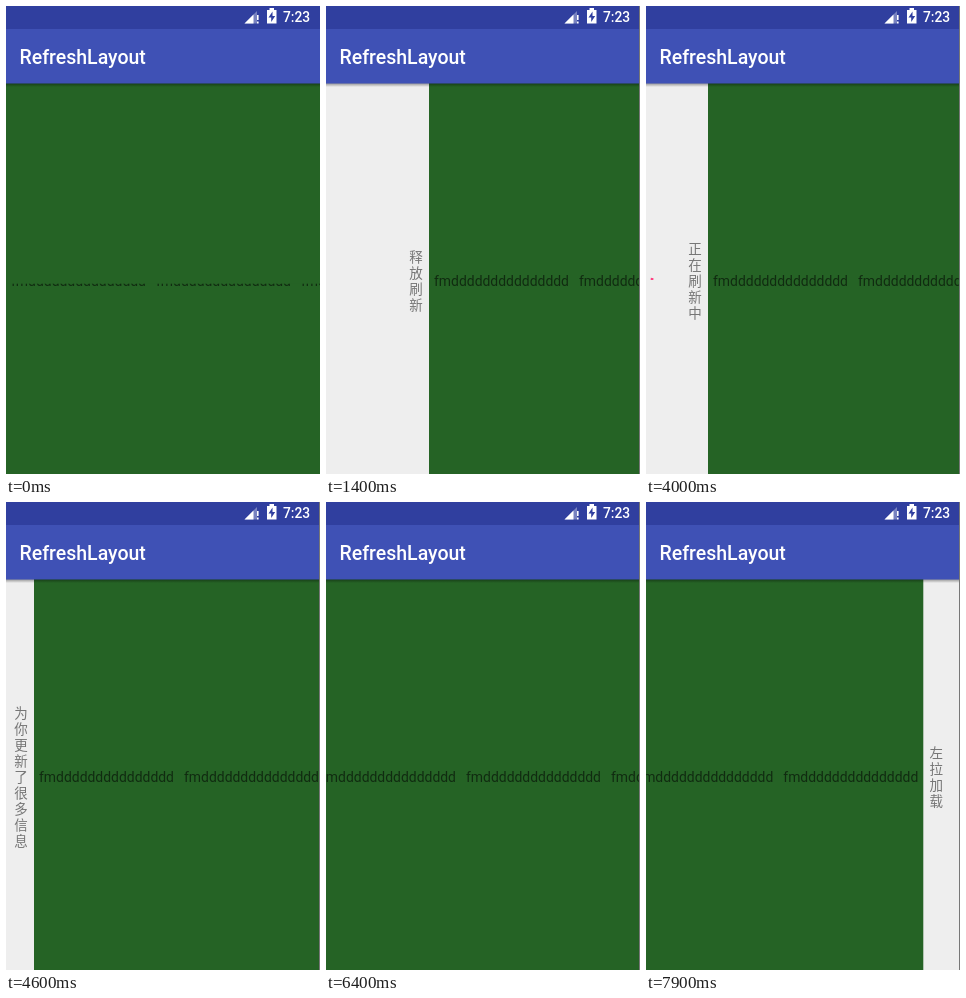
An HTML page for the animation above (8000 ms loop, 314 by 468 pixels).

```html
<!DOCTYPE html>
<html lang="en">
<head>
<meta charset="utf-8">
<title>RefreshLayout</title>
<style>
  html, body { margin: 0; width: 100%; height: 100%; overflow: hidden; background: #256325; }
  svg { display: block; width: 314px; height: 468px; }
  .bar { font-family: Roboto, sans-serif; font-weight: 500; fill: #fff; }
  .item { font: 13.95px Roboto, sans-serif; fill: #000; fill-opacity: .56; }
  .label { font: 13.5px "Noto Sans CJK SC", "Noto Sans CJK", "Noto Sans CJK JP", sans-serif; fill: #757575; text-anchor: middle; }
</style>
</head>
<body>
<svg viewBox="0 0 314 468">
  <defs>
    <linearGradient id="shade" x2="0" y2="1">
      <stop offset="0" stop-opacity=".4"/>
      <stop offset="1" stop-opacity="0"/>
    </linearGradient>
  </defs>
  <rect width="314" height="468" fill="#256325"/>
  <g id="items"></g>
  <rect id="cover" y="262" width="314" height="15.7" fill="#256325"/>
  <g id="header">
    <rect x="-314" y="77" width="314" height="391" fill="#eee"/>
    <path id="spinner" fill="none" stroke="#ff4081" stroke-width="2.7"/>
    <g id="headerLabel" class="label"></g>
  </g>
  <g id="footer">
    <rect y="77" width="314" height="391" fill="#eee"/>
    <g id="footerLabel" class="label"></g>
  </g>
  <rect y="77" width="314" height="4" fill="url(#shade)"/>
  <rect width="314" height="23" fill="#303f9f"/>
  <rect y="23" width="314" height="54.5" fill="#3f51b5"/>
  <g class="bar">
    <text x="13.5" y="58" font-size="19.5">RefreshLayout</text>
    <text x="277" y="16" font-size="13.8">7:23</text>
    <path d="M238.500 17.500L251 5V17.500Z" fill-opacity=".35"/>
    <path d="M238.500 17.500L247.500 8.500V17.500Z"/>
    <path d="M251 9h1.600v5h-1.600zM251 15.500h1.600v2h-1.600z"/>
    <path d="M261 4h2.500v-2h4.500v2h2.500v13.500h-9.500z"/>
    <path d="M266.500 5.500l-4 6h2.700v4.500l4-6h-2.700z" fill="#303f9f"/>
  </g>
  <rect id="edge" x="313" width="1" height="468" fill="#777"/>
</svg>
<script>
const LOOP = 8000, STEP = 100, STAGE = 313;
const PITCH = 145, COUNT = 3, MIDDLE = 275;
const $ = id => document.getElementById(id);

// Each track: start time followed by one value per step; the last one holds.
const pullTrack = [
  [0, 0],
  [800, 24, 49, 70, 84, 93, 99, 103, 105, 105],
  [1700, 98, 80, 67, 62],
  [4400, 53, 37, 28, 25],
  [5600, 19, 8, 2, 0]
];
const scrollTrack = [
  [0, 0],
  [6400, 10, 34, 62, 88, 109, 124, 135, 144, 150],
  [7900, 157.7]
];

function valueAt(track, time) {
  const [start, ...values] = track.filter(row => row[0] <= time).pop();
  return values[Math.min(Math.floor((time - start) / STEP), values.length - 1)];
}

function writeDown(group, text, x) {
  if (group.dataset.text === text) return;
  group.dataset.text = text;
  const top = MIDDLE - (text.length - 1) * 7.95;
  group.innerHTML = [...text].map((char, i) =>
    `<text x="${x}" y="${top + i * 15.9 + 5}">${char}</text>`).join("");
}

function headerText(time, pull) {
  if (time >= 4400) return "为你更新了很多信息";
  if (time >= 1700) return "正在刷新中";
  return pull > 62 ? "释放刷新" : "右拉刷新";
}

const clamp = v => Math.max(0, Math.min(1, v));
const ease = v => v < .4 ? 3.1 * v * v : 1 - 1.4 * (1 - v) ** 2;

// The head runs ahead for half a cycle, then the tail catches up.
function spinnerPath(time) {
  const phase = (time - 4000) / 1133.33;
  const cycle = Math.floor(phase + 1e-4), part = clamp(phase - cycle);
  const base = 180 + phase * 220 + cycle * 270;
  const tail = base + 270 * ease(clamp(part * 2 - 1));
  const head = base + 270 * ease(clamp(part * 2)) + 10;
  const point = deg => {
    const a = deg * Math.PI / 180;
    return `${-44.3 + 11.7 * Math.cos(a)} ${274 + 11.7 * Math.sin(a)}`;
  };
  return `M${point(tail)}A11.7 11.7 0 ${head - tail > 180 ? 1 : 0} 1 ${point(head)}`;
}

const slide = (id, x) => $(id).setAttribute("transform", `translate(${x} 0)`);
const show = (id, on) => $(id).setAttribute("visibility", on ? "visible" : "hidden");

$("items").innerHTML = Array.from({ length: COUNT }, (_, i) =>
  `<text class="item" x="${5 + i * PITCH}" y="280">fm${"d".repeat(15)}</text>`).join("");
writeDown($("footerLabel"), "左拉加载", 13);

function draw(now) {
  const time = Math.floor((now % LOOP) / STEP) * STEP;
  const pull = valueAt(pullTrack, time), scroll = valueAt(scrollTrack, time);
  const end = COUNT * PITCH - scroll;
  slide("items", pull - scroll);
  slide("header", pull);
  slide("footer", Math.max(end, 0));
  show("header", pull > 0);
  show("footer", end < STAGE);
  show("cover", time < 800);
  show("edge", time >= 500);
  show("spinner", pull > 0 && time >= 1700 && time < 4400);
  $("spinner").setAttribute("d", spinnerPath(time));
  writeDown($("headerLabel"), headerText(time, pull), -13);
}

let began;
function tick(now) {
  began ??= now;
  draw(Math.max(0, now - began));
  requestAnimationFrame(tick);
}
draw(0);
requestAnimationFrame(tick);
</script>
</body>
</html>
```
